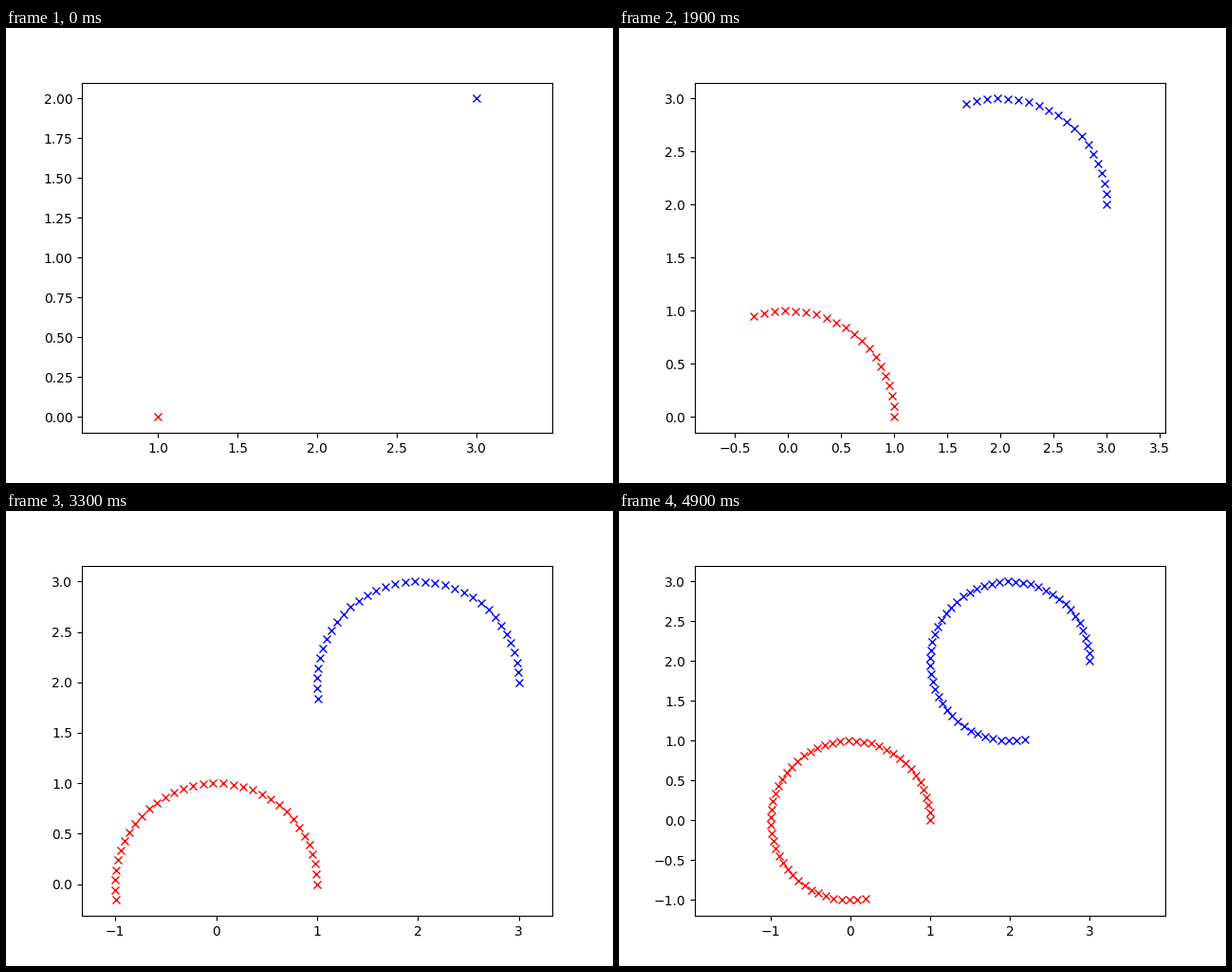
Animation of 640x480 px, one loop 5 s. Source, as a matplotlib script:

```python
import matplotlib.pyplot as plt
import numpy as np
from matplotlib.animation import FuncAnimation

FRAMES = 50
INTERVAL = 100
STEP = 0.1  # radians travelled per frame

fig, ax = plt.subplots(figsize=(6.4, 4.8), dpi=100)


def draw(frame):
    """Trace two unit circles, rescaling the axes to the points so far."""
    angle = STEP * np.arange(frame + 1)
    x, y = np.cos(angle), np.sin(angle)
    ax.clear()
    ax.plot(x, y, "rx")
    ax.plot(x + 2, y + 2, "bx")
    ax.axis("equal")


anim = FuncAnimation(fig, draw, frames=FRAMES, interval=INTERVAL,
                     init_func=lambda: draw(0), repeat=True, repeat_delay=0)
plt.show()
```
